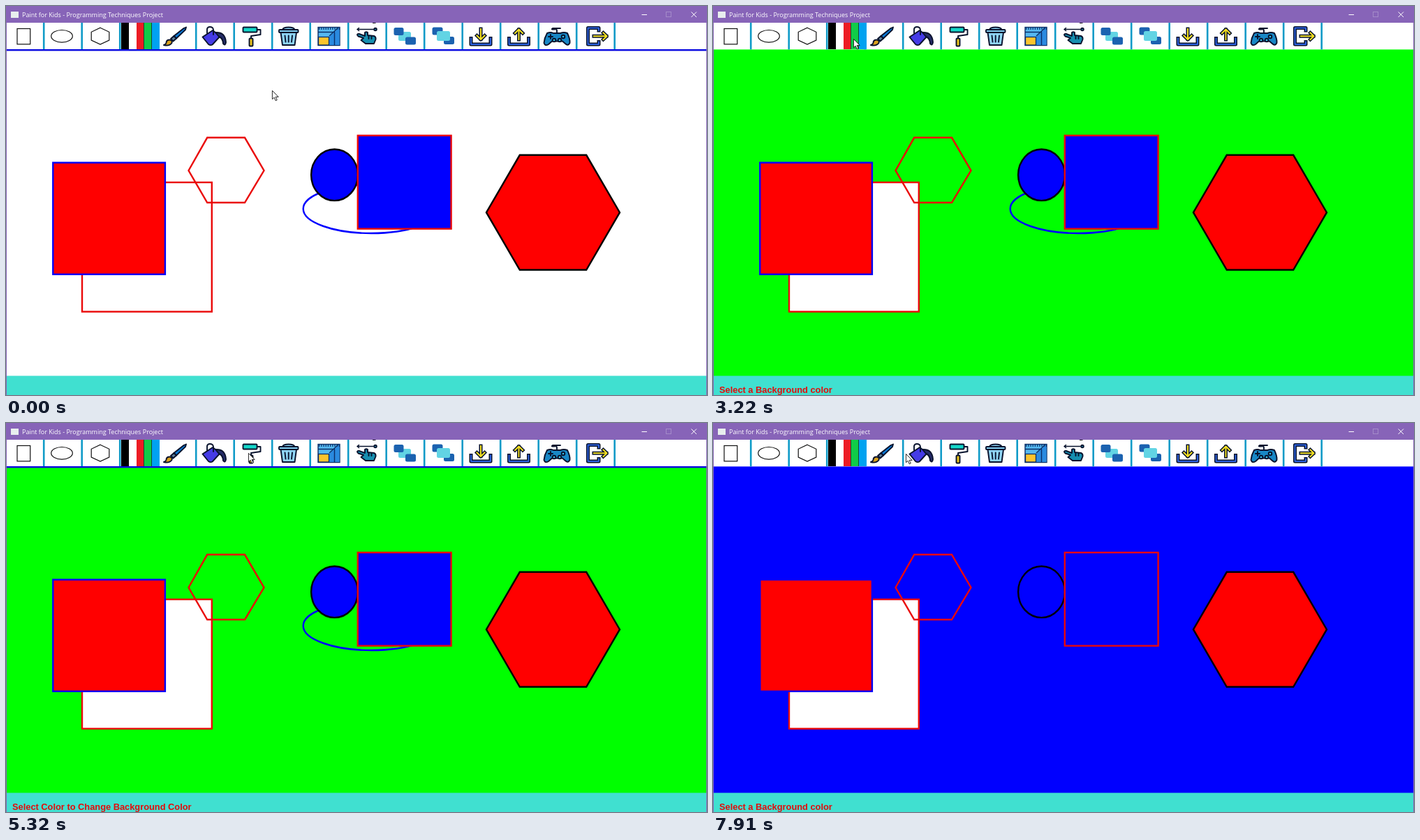
Animation of 1004 by 558 pixels, one loop 7990 ms. Source, as an HTML page:

```html
<!DOCTYPE html>
<html lang="en">
<head>
<meta charset="utf-8">
<title>Paint for Kids</title>
<style>
  html, body { margin: 0; width: 100%; height: 100%; overflow: hidden; background: #fff; }
  svg { display: block; width: 100%; height: 100%; }
  .title { font: 9px "Open Sans", "Noto Sans", sans-serif; fill: #fff; }
  .status { font: bold 12.84px "Liberation Sans", Arial, sans-serif; fill: #e30c0c; }
  .line { fill: none; }
  .ink { stroke: #08122c; stroke-width: 1.9; stroke-linejoin: round; stroke-linecap: round; }
  .thin { fill: none; stroke: #111; stroke-width: 1.2; }
  .red { stroke: #ea0808; stroke-width: 2.4; }
  .blue { stroke: #00f; stroke-width: 2.4; }
  .black { stroke: #000; stroke-width: 2.4; }
</style>
</head>
<body>
<svg viewBox="0 0 1004 558">
  <rect width="1004" height="558" fill="#8764b8"/>
  <rect id="paper" x="1" y="62" width="1002" height="469" fill="#fff"/>

  <!-- drawing -->
  <rect class="red" x="109" y="253" width="185.8" height="185.5" fill="#fff"/>
  <path class="line red" d="M261.5 236L288.200 188.800H342L369.500 236L342 282H288.200Z"/>
  <rect class="blue" x="67.3" y="224.700" width="160.600" height="160.200" fill="#f00"/>
  <ellipse class="line blue" cx="523" cy="291" rx="97.3" ry="35"/>
  <ellipse class="black" cx="470.5" cy="242.3" rx="33.4" ry="36.8" fill="#00f"/>
  <rect class="red" x="503.8" y="185.800" width="133.800" height="133.800" fill="#00f"/>
  <path class="black" d="M688 296.200L735.800 213.800H831.200L879 296.200L831.200 378.500H735.800Z" fill="#f00"/>

  <!-- title bar -->
  <rect x="7" y="8" width="11" height="9" fill="#e8eeee"/>
  <text class="title" x="23" y="15.6">Paint for Kids - Programming Techniques Project</text>
  <g class="line" stroke="#fff">
    <path d="M910.5 12.5H918"/>
    <rect x="945.5" y="8.5" width="7" height="7" stroke="#a48bc9"/>
    <path d="M981.5 8.5L989 16M989 8.5L981.5 16"/>
  </g>

  <!-- toolbar -->
  <rect x="1" y="24" width="1002" height="38.4" fill="#fff"/>
  <g id="bars" fill="#109bc8"></g>
  <rect id="rule" x="1" y="62" width="1002" height="2.4" fill="#0a0ae0"/>

  <rect class="thin" x="16" y="32.5" width="18.7" height="22.3"/>
  <ellipse class="thin" cx="80" cy="43.3" rx="15.3" ry="8.8"/>
  <path class="thin" d="M135 31.2L147.8 37.3V49L135 55L122.2 49V37.3Z"/>

  <g id="swatches" shape-rendering="crispEdges"></g>

  <g class="ink"><!-- brush -->
    <path d="M258 30.5L254.500 32L240.500 43L244 46.500L257 34Z" fill="#0b7ad6"/>
    <path d="M240.500 43L236 47L239.500 50.500L244 46.500Z" fill="#5f7f98"/>
    <path d="M234.500 48.500Q229.500 48.500 229.500 53Q228.500 55.500 226 56Q234 58 237.500 53Q238 51 237.500 50Z" fill="#d9a11c"/>
  </g>
  <g class="ink"><!-- bucket -->
    <path d="M281.500 44.500L296 35L307 43L295.500 55.500Q293 57 290 55Z" fill="#453be6"/>
    <path class="line" d="M288 39V33Q288.500 30 292 30Q296.500 30 297 34V41"/>
    <path d="M300 38Q314 37 315 52Q314 58 311 54Q310.500 46 305 44Z" fill="#252c68"/>
  </g>
  <g class="ink"><!-- roller -->
    <rect x="339.500" y="30.500" width="20" height="7" rx="1" fill="#14d6c8"/>
    <path class="line" d="M360 34H364.500V41L351 43V47"/>
    <rect x="348.500" y="46.500" width="5" height="11" rx="1" fill="#e8c21c"/>
  </g>
  <g class="ink"><!-- bin -->
    <path d="M396 34Q397 30.500 404.700 30.500T413.500 34Z" fill="#8fd4f4"/>
    <rect x="391" y="34" width="27.500" height="4" rx="1" fill="#83cdf0"/>
    <path d="M393.500 38H416L413.500 56H396Z" fill="#8fd4f4"/>
    <path class="line" d="M399.500 42.500L400.500 51.500M404.700 42.500V51.500M410 42.500L409 51.500"/>
  </g>
  <g><!-- resize -->
    <rect x="447" y="30.500" width="31" height="26" fill="#55b8f0" stroke="#0b2f68" stroke-width="1.400"/>
    <path d="M463 44L477.500 30.500V56H463Z" fill="#2a8ae0"/>
    <path d="M447 37.500H471M463 43L476 31M470.500 38V56" fill="none" stroke="#0b2f68" stroke-width="1.4"/>
    <path d="M448 32.500H478" stroke="#0b2f68" stroke-width="3" stroke-dasharray="1.2 2"/>
    <rect x="447.500" y="44.500" width="15" height="11.500" fill="#fcc42c" stroke="#0b2f68" stroke-width="1.3"/>
  </g>
  <g class="ink"><!-- hand -->
    <path class="line" d="M503 33.500H526M505.500 31.500L503 33.500L505.500 35.500" stroke-width="1.500"/>
    <circle cx="529" cy="33.500" r="1.800" fill="#2aa5c8"/>
    <path d="M503 41.500Q503 39.500 506 40L514 43V38Q516 36.500 518 38V42L527 43Q530 44 529.500 48L527 54H515L508.500 49L512 46L504.500 43.500Z" fill="#168fb0"/>
    <path class="line" d="M519.500 43V47M523.500 43.500V47"/>
    <rect x="525" y="24" width="4.500" height="1" fill="#222" stroke="none"/>
  </g>
  <g id="stacks"></g>
  <g id="outlines" fill="none" stroke-linejoin="round"></g>
  <g class="ink"><!-- gamepad -->
    <path class="line" d="M789 38V35Q789 33 785 33.500Q780 34 783 32H794"/>
    <path d="M775 39Q780 37 784 39H794Q799 37 804 39Q808 47 807.500 53Q805 58 801 54L797 50.500H782L777 55Q772 58 770.500 53Q771 46 775 39Z" fill="#1787c6"/>
    <path class="line" d="M777 44H783M780 41V47"/>
    <circle cx="798" cy="44" r="2.300" fill="#38c4e8"/>
    <circle cx="785" cy="49" r="2.300" fill="#38c4e8"/>
    <circle cx="793" cy="49" r="2.300" fill="#38c4e8"/>
  </g>

  <!-- status bar -->
  <rect x="1" y="530.500" width="1002" height="27.500" fill="#40e0d0"/>
  <text id="status" class="status" x="9" y="555.3"></text>

  <path id="cursor" d="M.4 .4V12.700L3.200 10.200L5.200 14.800L7.200 13.900L5.200 9.400H9.200Z"
        fill="#fff" stroke="#111" stroke-width=".9"/>
</svg>
<script>
const $ = id => document.getElementById(id);
const LOOP = 7990;

// Toolbar parts that repeat
for (let i = 1; i <= 16; i++)
  $("bars").innerHTML += `<rect x="${54.5 * i - 1.6}" y="24" width="2.6" height="38.4"/>`;

["#000", "#fff", "#ed1c24", "#10cc48", "#00a2f0"].forEach((c, i) => {
  $("swatches").innerHTML += `<rect x="${164.5 + 11 * i}" y="24" width="11" height="38.4" fill="${c}"/>`;
});
$("swatches").innerHTML += '<path d="M197.500 24V62.400M208.500 24V62.400" stroke="#154a30"/>';

const card = (x, y, w, h, c) =>
  `<rect x="${x}" y="${y}" width="${w}" height="${h}" rx="2.500" fill="${c}"/>`;
const DARK = "#1b62b0", PALE = "#62d4e4";
$("stacks").innerHTML =
  card(562, 37, 18, 13, PALE) + card(555.5, 31, 14, 11, DARK) + card(572, 44.500, 15, 11, DARK) +
  card(610.5, 30.500, 15, 11, DARK) + card(627, 44, 15, 11, DARK) + card(617, 36, 19, 14, PALE);

// A coloured line with a dark edge
const outlined = (d, color) =>
  `<path d="${d}" stroke="#08122c" stroke-width="5" stroke-linecap="square"/>` +
  `<path d="${d}" stroke="${color}" stroke-width="2" stroke-linecap="square"/>`;
const BLUE = "#2d62e0", YELLOW = "#f4e020";
const tray = x => outlined(`M${x - 14} 46.500V55H${x + 14}V46.500`, BLUE);
$("outlines").innerHTML =
  tray(680) + outlined("M680 33V47.500M674.500 42.500L680 48L685.500 42.500", YELLOW) +
  tray(734.5) + outlined("M734.500 48V34M729 39L734.500 33.500L740 39", YELLOW) +
  outlined("M849 35V31.500H833.500V55H849V51.500", BLUE) +
  outlined("M842 43.300H860M855.500 38.500L860.500 43.300L855.500 48", YELLOW);

// Pointer moves: first step, last step, step count, x, y, ease-out power
const MOVES = [
  [80, 470, 6, 354, 37, 2],
  [1880, 2650, 11, 206, 49, 2],
  [2730, 2810, 2, 201, 47, 1],
  [4280, 4820, 8, 347, 43, 2.56],
  [5980, 6690, 10, 212, 36, 2],
  [7830, 7910, 2, 276, 44, 1]
];
const ASK = "Select Color to Change Background Color";
const DONE = "Select a Background color";
const STATUS = [[0, ""], [1130, ASK], [3220, DONE], [5320, ASK], [7100, DONE]];
const PAPER = [[0, "#fff"], [3220, "#0f0"], [7100, "#00f"]];
const RULE = [[0, 1], [3220, 0], [3380, 1], [7100, 0]];

const valueAt = (table, t) => table.filter(row => row[0] <= t).pop()[1];

function pointerAt(t) {
  let x = 381, y = 121;
  for (const [from, to, count, nx, ny, power] of MOVES) {
    if (t < from) break;
    const step = Math.min(count, 1 + Math.floor((t - from) / (to - from) * (count - 1) + 0.01));
    const k = 1 - (1 - step / count) ** power;
    x += (nx - x) * k;
    y += (ny - y) * k;
  }
  return [Math.round(x), Math.round(y)];
}

function draw(t) {
  $("cursor").setAttribute("transform", `translate(${pointerAt(t)})`);
  $("paper").setAttribute("fill", valueAt(PAPER, t));
  $("rule").setAttribute("opacity", valueAt(RULE, t));
  $("status").textContent = valueAt(STATUS, t);
}

const start = performance.now();
function tick() {
  draw((performance.now() - start) % LOOP);
  requestAnimationFrame(tick);
}
tick();
</script>
</body>
</html>
```
